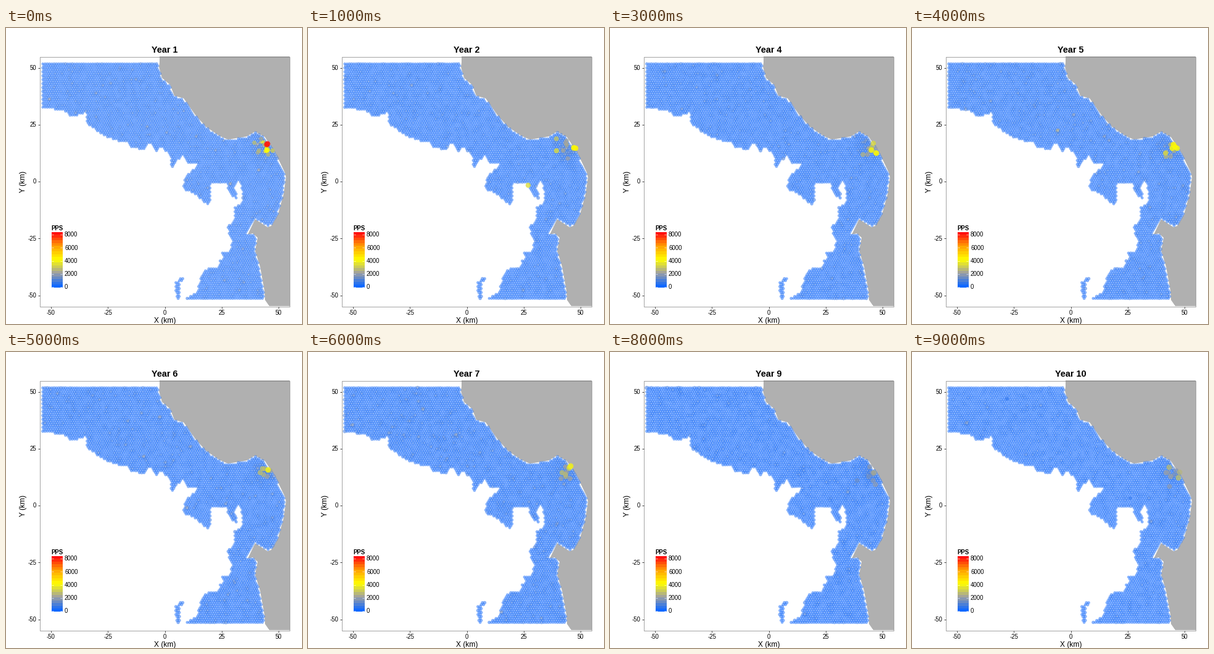
These frames come from a looping animation (480x480 px, 10000 ms). A matplotlib script:

```python
import numpy as np
import matplotlib.pyplot as plt
from matplotlib.animation import FuncAnimation
from matplotlib.colors import LinearSegmentedColormap
from matplotlib.patches import Polygon, Rectangle
from matplotlib.path import Path

plt.rcParams["font.family"] = ["Liberation Sans", "DejaVu Sans"]
plt.rcParams["axes.unicode_minus"] = False

SIZE, DPI = 480, 100
PT = 72 / DPI            # points per pixel
KM = 3.69                # pixels per kilometre
CX, CY = 257.5, 249
TOP_VALUE = 8200
HUB = (421, 194)

# Outlines in stage pixels
COAST = [(249, 56), (248, 63), (253, 81), (266, 92), (273, 110), (288, 114),
         (307, 141), (324, 160), (346, 175), (360, 181), (390, 176),
         (404, 168), (420, 177), (437, 203), (452, 234), (454, 242),
         (450, 270), (441, 302), (430, 321), (424, 323), (404, 310),
         (392, 335), (400, 333), (408, 340), (404, 361), (412, 387),
         (419, 426), (420, 441)]
SHELF_WEST = [(57.5, 56), (57.5, 130), (95, 136), (108, 146), (128, 138),
              (130, 156), (155, 173), (175, 183), (196, 187), (203, 194),
              (225, 200), (234, 187), (243, 203), (252, 194), (265, 207),
              (267, 229), (287, 208), (292, 221), (311, 221), (288, 242),
              (286, 262), (305, 270), (326, 288), (332, 286), (333, 254)]
SHELF_SOUTH = [(357, 252), (361, 269), (374, 279), (376, 271), (371, 260),
               (377, 249), (383, 267), (380, 286), (369, 289), (369, 311),
               (357, 324), (365, 345), (362, 361), (345, 362), (353, 373),
               (344, 376), (345, 386), (322, 390), (315, 400), (309, 428),
               (289, 437), (289, 442)]
ISLAND = [(273, 412), (288, 401), (289, 407), (283, 414), (284, 442),
          (275, 442)]

# Highest value, background level and cloud level of each year
PEAK = [8200, 4800, 4500, 4200, 4700, 4200, 3800, 1800, 2400, 2800]
LEVEL = [120, 100, 100, 105, 115, 110, 115, 75, 75, 70]
CLOUD = [900, 560, 560, 520, 520, 480, 400, 230, 250, 260]

# Strongest cells of each year: x, y, share of the peak
STRONG = [
    [(422, 199, 0.5), (424, 198, 0.5), (424, 188, 1), (423, 189, 0.97)],
    [(357, 255, 0.7), (403, 199, 0.7), (431, 194, 0.85), (434, 195, 0.9)],
    [(429, 198, 0.87), (425, 200, 0.93)],
    [(427, 187, 0.78), (424, 198, 0.93), (432, 203, 1)],
    [(411, 203, 0.68), (424, 189, 0.9), (427, 193, 0.9), (430, 195, 0.85),
     (422, 195, 0.85)],
    [(425, 191, 0.93)],
    [(418, 202, 0.65), (424, 187, 0.9), (426, 185, 1)],
    [(394, 197, 0.8), (360, 219, 0.8), (339, 201, 0.75), (387, 396, 0.75),
     (298, 262, 0.65)],
    [(428, 196, 0.95)],
    [(154, 76, 0.16), (354, 237, 0.16), (417, 187, 0.95), (434, 195, 0.9),
     (432, 204, 1)],
]

CMAP = LinearSegmentedColormap.from_list(
    "pps", [(0.06, 0.41, 1.0), (0.63, 0.63, 0.63), "yellow",
            "orange", (1, 0.06, 0.06)])


def hex_grid():
    """Centres of the hexagonal cells lying inside the water."""
    pts = []
    for i, y in enumerate(np.arange(58.2, 441, KM * 0.866)):
        x = np.arange(59.6 + (i % 2) * KM / 2, 456, KM)
        pts.append(np.column_stack([x, np.full(len(x), y)]))
    pts = np.vstack(pts)
    inside = np.zeros(len(pts), bool)
    for shape in (SHELF_WEST + SHELF_SOUTH + COAST[::-1], ISLAND):
        keep = np.ones(len(pts), bool)
        for d in [(1.4, 0), (-1.4, 0), (0, 1.4), (0, -1.4)]:
            keep &= Path(shape).contains_points(pts + d)
        inside |= keep
    return pts[inside]


def year_cells(k):
    """Positions, dot areas and colours for one year."""
    rng = np.random.default_rng(100 + k)
    n, peak = len(GRID), PEAK[k]
    v = LEVEL[k] * np.exp(rng.normal(0, 0.75, n))
    near = np.exp(-((GRID - HUB) ** 2).sum(axis=1) / 300)
    v += CLOUD[k] * near * rng.exponential(1, n)
    v = np.minimum(v, 0.5 * peak)
    # medium cells clustered around the hub
    p = near ** 2
    mid = rng.choice(n, 7, replace=False, p=p / p.sum())
    mid_v = rng.uniform(0.5, 0.78, 7) * min(peak, 4000)
    hot = np.array(STRONG[k])
    pos = np.vstack([GRID, GRID[mid], hot[:, :2]])
    v = np.concatenate([v, mid_v, hot[:, 2] * peak])
    diam = 4.1 + 5 * np.sqrt(v / peak)
    rgba = CMAP(np.clip(v / TOP_VALUE, 0, 1))
    rgba[:, 3] = 0.5 + 0.35 * np.clip(v / 4000, 0, 1)
    return pos, (diam * PT) ** 2, rgba


def label(x, y, s, px, **kw):
    return ax.text(x, y, s, fontsize=px * PT, color="black",
                   **{"ha": "center", "va": "baseline", **kw})


def line(xs, ys, color, px):
    ax.plot(xs, ys, color=color, lw=px * PT, solid_capstyle="butt", zorder=6)


fig = plt.figure(figsize=(SIZE / DPI, SIZE / DPI), dpi=DPI, facecolor="white")
ax = fig.add_axes([0, 0, 1, 1])
ax.axis("off")

land = [(249, 46)] + COAST + [(427, 451), (460, 451), (460, 46)]
ax.add_patch(Polygon(land, fc="#b0b0b0", ec="none", zorder=1))

GRID = hex_grid()
CELLS = [year_cells(k) for k in range(len(PEAK))]
dots = ax.scatter([], [], linewidths=0, zorder=3)

ax.add_patch(Rectangle((55, 46.5), 405, 405, fill=False, ec="#7f7f7f",
                       lw=0.7 * PT, zorder=5))
for t in range(-50, 51, 25):
    x, y = CX + KM * t, CY - KM * t
    line([x, x], [451.5, 455], "black", 0.7)
    line([51.5, 55], [y, y], "black", 0.7)
    label(x, 465, str(t), 9.6)
    label(49.3, y + 3.5, str(t), 9.6, ha="right")
label(CX, 478, "X (km)", 12)
label(31, CY, "Y (km)", 12, rotation=90, rotation_mode="anchor")

# Colour key
label(73.5, 328, "PPS", 9.6, ha="left", weight="bold")
ax.imshow(np.linspace(1, 0, 20)[:, None], cmap=CMAP, vmin=0, vmax=1,
          extent=(73.5, 91, 421.5, 332), aspect="auto",
          interpolation="nearest", zorder=4)
for t in range(0, 8001, 2000):
    y = 420 - t * 85 / 8000
    line([73.5, 77], [y, y], "white", 0.6)
    line([87.5, 91], [y, y], "white", 0.6)
    label(95, y + 3.4, str(t), 9.6, ha="left")
ax.set_xlim(0, SIZE)
ax.set_ylim(SIZE, 0)

title = label(CX, 40, "", 14.4, weight="bold")


def draw(k):
    pos, area, rgba = CELLS[k]
    dots.set_offsets(pos)
    dots.set_sizes(area)
    dots.set_facecolors(rgba)
    title.set_text(f"Year {k + 1}")
    return dots, title


anim = FuncAnimation(fig, draw, frames=len(PEAK), interval=1000,
                     repeat=True, repeat_delay=0, blit=False)
plt.show()
```
